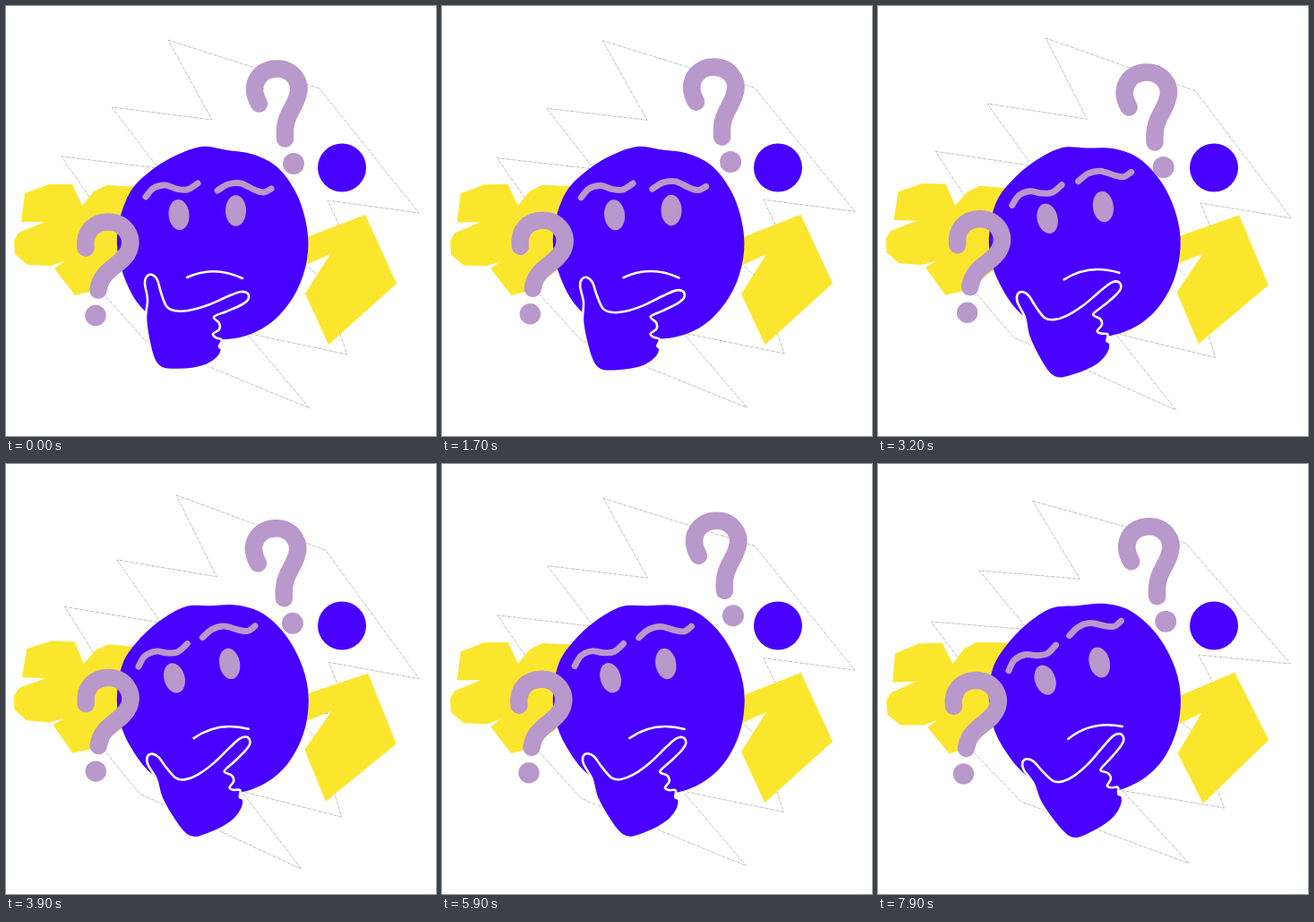
These frames come from a looping animation (480x480 px, 8000 ms). An HTML page:

```html
<!DOCTYPE html>
<html lang="en">
<head>
<meta charset="utf-8">
<title>Thinking face</title>
<style>
  html, body { margin: 0; width: 100%; height: 100%; overflow: hidden; background: #fff; }
  svg { display: block; width: 100vw; height: 100vh; }
  .blue { fill: #4800ff; }
  .yellow { fill: #fbe62e; }
  .lilac { fill: #b998cb; }
  .line { fill: none; stroke-linecap: round; stroke-linejoin: round; }
  .mark { stroke: #b998cb; stroke-width: 19.5; }
  .brow { stroke: #b998cb; stroke-width: 7; }
  .white { stroke: #fff; stroke-width: 2.6; stroke-linejoin: round; }
  #bolt { fill: #fff; stroke: #888; stroke-width: .6; stroke-dasharray: 3 1 1 1; }
</style>
</head>
<body>
<svg viewBox="0 0 480 480">
  <polygon id="bolt" points="181,38 350,92 461,231 359,217 384,270 325,280 352,305 381,389 268,365 339,449 155,373 95,306 115,245 62,168 170,181 118,113 230,127"/>
  <polygon id="leaf" class="yellow" points="17,241 21,209 48,199 74,199 85,223 98,207 112,200 150,202 150,280 130,294 97,318 77,323 54,293 65,285 50,290 24,289 10,277 9,262 14,253 43,241"/>
  <polygon id="arrow" class="yellow" points="328,261 401,233 436,310 360,378 334,321 362,277 328,292"/>
  <circle class="blue" cx="375" cy="180.5" r="27"/>
  <g id="face">
    <path id="head" class="blue"/>
    <ellipse class="lilac" cx="193" cy="233" rx="11.5" ry="17" transform="rotate(-5 193 233)"/>
    <ellipse class="lilac" cx="256.5" cy="228.5" rx="11.5" ry="17.3"/>
    <path id="browL" class="line brow"/>
    <path id="browR" class="line brow"/>
    <path class="line white" d="M202 303Q232 289 264 304"/>
  </g>
  <path id="hand" class="blue white"/>
  <g id="askR">
    <path class="line mark" d="M282 109C270 88 282 70 302 70C320 70 330 86 325 100C321 116 309 122 311 148"/>
    <circle class="lilac" cx="320.5" cy="176" r="12"/>
  </g>
  <g id="askL">
    <path class="line mark" d="M89 270C87 252 98 241 114 241C132 241 143 257 137 273C130 290 106 293 103 317"/>
    <circle class="lilac" cx="100" cy="345.5" r="11.7"/>
  </g>
</svg>
<script>
const LOOP = 8000, STEP = 100;
const el = id => document.getElementById(id);
const pairs = text => text.split(' ').map(s => s.split(',').map(Number));

// Smooth path through a few points
function curve(id, text, closed) {
  const p = pairs(text), n = p.length;
  const at = i => closed ? p[(i + n) % n] : p[Math.max(0, Math.min(n - 1, i))];
  let d = 'M' + p[0];
  for (let i = 0; i < (closed ? n : n - 1); i++) {
    const [a, b, c, e] = [at(i - 1), at(i), at(i + 1), at(i + 2)];
    const c1 = b.map((v, k) => v + (c[k] - a[k]) / 6);
    const c2 = c.map((v, k) => v - (e[k] - b[k]) / 6);
    d += `C${c1} ${c2} ${c}`;
  }
  el(id).setAttribute('d', d + (closed ? 'Z' : ''));
}

curve('head', '219,157 247,161 277,166 304,181 325,211 336,248 336,283 324,319 300,350 268,368 230,372 185,364 149,334 131,300 124,268 127,238 139,207 159,186 187,168', true);
curve('browL', '156,213 165,203 178,200 190,204 202,205 214,198');
curve('browR', '236,206 248,199 262,198 277,205 287,208 296,204');
curve('hand', '161,381 156,350 158,328 155,310 157,302 163,300 169,306 173,320 179,335 188,340 203,340 225,334 248,324 262,319 270,321 270,328 262,334 246,341 232,347 238,354 238,361 231,366 234,370 241,373 238,380 241,384 236,393 224,401 208,405 192,406 176,405 167,398', true);

// Cosine ease between "time,value" turning points
function wave(text) {
  const keys = pairs(text);
  return t => {
    const i = keys.findIndex(k => k[0] > t);
    if (i < 0) return keys[keys.length - 1][1];
    const [t0, a] = keys[i - 1], [t1, b] = keys[i];
    return a + (b - a) * (1 - Math.cos(Math.PI * (t - t0) / (t1 - t0))) / 2;
  };
}

const swing = wave('0,0 .45,3 1.25,-1.5 1.8,-.4 2.3,-3.5 3.65,3.4 5.05,-8.4 6.4,3.3 7.7,-2.3');
const think = wave('0,0 1.7,.1 2.6,.51 3.9,.78 5.1,1 6.7,.53 7.9,.97');
const bobR = wave('0,0 1.5,-2.1 3.2,4 5.6,-6.9 8,-.2');
const swayL = wave('0,0 2.4,-2 3.7,.5 5.1,-4.3 6.7,-1.6 7.9,-4.5');
const bobL = wave('0,0 3.2,-3.3 5.3,.2 6.6,-2 7.9,.4');

function place(id, x, y, turn = 0, cx = 0, cy = 0) {
  el(id).setAttribute('transform', `translate(${x} ${y}) rotate(${turn} ${cx} ${cy})`);
}

function draw(t) {
  const s = swing(t), p = think(t), r = bobR(t);
  place('bolt', 0, 0, s, 260, 245);
  place('leaf', 0, 0, s, 85, 260);
  place('arrow', 0, 0, s, 385, 305);
  place('face', 0, -2 * p, -14.5 * p ** 1.3, 231, 264);
  place('browR', -5 * p, -15 * p);
  place('hand', 2.5 * p - 3.5 * Math.sin(Math.PI * p), 5.5 * p, -26.7 * p, 215.5, 310.5);
  place('askR', .5 - .6 * r, r);
  place('askL', swayL(t), bobL(t));
}

const start = performance.now();
function tick() {
  const ms = (performance.now() - start) % LOOP;
  draw(Math.floor(ms / STEP) * STEP / 1000);
  requestAnimationFrame(tick);
}
tick();
</script>
</body>
</html>
```
